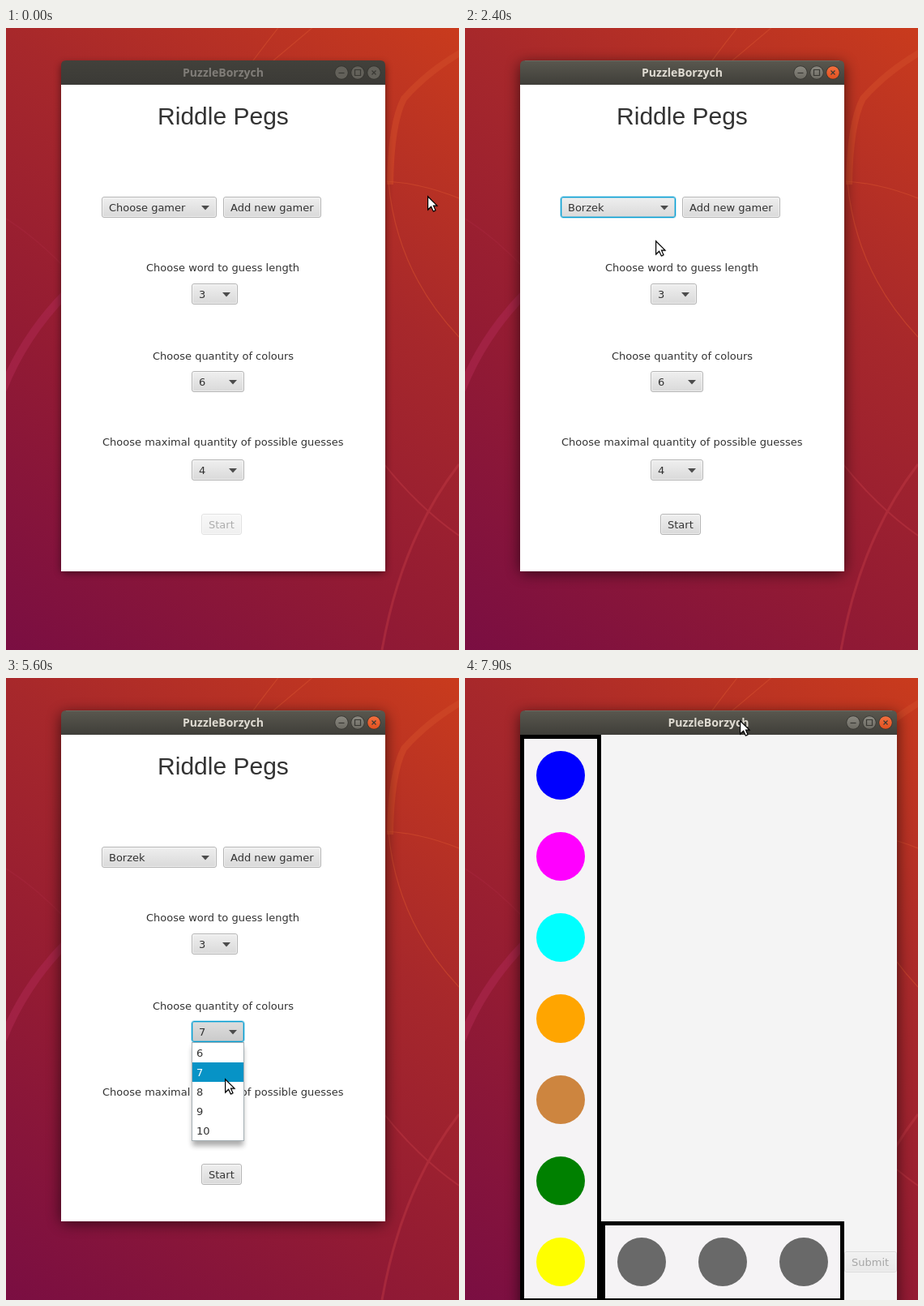
Recreate the animation shown at these times as an HTML page. Size 559x767 px, loop 8000 ms.

```html
<!DOCTYPE html>
<html lang="en">
<head>
<meta charset="utf-8">
<title>Riddle Pegs</title>
<style>
html, body { margin: 0; width: 100%; height: 100%; overflow: hidden; background: #951b33; }
svg { display: block; width: 559px; height: 767px; cursor: default; user-select: none; }
text { font: 13px "DejaVu Sans", sans-serif; fill: #333; white-space: pre; }
.head { font: 30px "Liberation Sans", Arial, sans-serif; text-anchor: middle; }
.bar { font: 700 14px "Open Sans", "Noto Sans", sans-serif; text-anchor: middle; }
</style>
</head>
<body>
<svg id="stage" viewBox="0 0 559 767" xmlns="http://www.w3.org/2000/svg">
  <defs>
    <linearGradient id="desk" gradientUnits="userSpaceOnUse" x1="0" y1="767" x2="559" y2="0">
      <stop offset="0" stop-color="#7a0e42"/><stop offset=".35" stop-color="#931b33"/>
      <stop offset=".65" stop-color="#a7282b"/><stop offset="1" stop-color="#c93b1d"/>
    </linearGradient>
    <linearGradient id="barOn" x2="0" y2="1"><stop stop-color="#5a584f"/><stop offset="1" stop-color="#3f3e39"/></linearGradient>
    <linearGradient id="barOff" x2="0" y2="1"><stop stop-color="#42413b"/><stop offset="1" stop-color="#3b3a36"/></linearGradient>
    <linearGradient id="knob" x2="0" y2="1"><stop stop-color="#8a8880"/><stop offset="1" stop-color="#6d6b63"/></linearGradient>
    <linearGradient id="close" x2="0" y2="1"><stop stop-color="#f4703f"/><stop offset="1" stop-color="#e1501f"/></linearGradient>
    <linearGradient id="normal" x2="0" y2="1"><stop stop-color="#efefef"/><stop offset="1" stop-color="#d9d9d9"/></linearGradient>
    <linearGradient id="hover" x2="0" y2="1"><stop stop-color="#fafafa"/><stop offset="1" stop-color="#e5e5e5"/></linearGradient>
    <linearGradient id="armed" x2="0" y2="1"><stop stop-color="#dedede"/><stop offset="1" stop-color="#cacaca"/></linearGradient>
    <filter id="soft" x="-20%" y="-20%" width="140%" height="140%"><feGaussianBlur stdDeviation="9"/></filter>
    <filter id="faint" x="-20%" y="-20%" width="140%" height="140%"><feGaussianBlur stdDeviation="5"/></filter>
    <filter id="drop" x="-30%" y="-30%" width="160%" height="170%"><feGaussianBlur stdDeviation="3"/></filter>
  </defs>
  <rect width="559" height="767" fill="url(#desk)"/>
  <g fill="none">
    <path d="M-4 446Q22 380 74 327" stroke="#a8264a" stroke-width="10" opacity=".7"/>
    <path d="M0 235Q36 258 70 293" stroke="#a82a40" stroke-width="1.5" opacity=".4"/>
    <path d="M474 193Q475 118 491 87Q520 54 563 29" stroke="#d04a28" stroke-width="8" opacity=".6"/>
    <g stroke="#d5502e" stroke-width="1.2" opacity=".55">
      <path d="M305 40Q335 0 360 -30M330 40Q354 20 380 -2"/>
      <path d="M470 189Q515 192 559 210M472 190Q482 300 559 381"/>
    </g>
    <g stroke="#c23a45" stroke-width="2" opacity=".45">
      <path d="M466 537Q508 590 559 626"/>
      <path d="M559 538Q488 630 464 767" stroke-width="3"/>
    </g>
  </g>
  <g id="view"></g>
  <g id="mouse">
    <path d="M1 1.5V18.5L5 14.8L7.7 20.5L10.8 19.1L8.2 13.5H13Z" fill="#000" opacity=".22"/>
    <path d="M.6 .8V17L4.6 13.2L7.3 19L10 17.8L7.5 12.2H12Z" fill="#fff" stroke="#000" stroke-width="1.2"/>
  </g>
</svg>
<script>
const LOOP = 8000, STEP = 100;
const view = document.getElementById('view');
const mouse = document.getElementById('mouse');

// time, x, y of the pointer tip
const path = [
  [200, 520, 207], [1100, 245, 227], [1200, 245, 227], [1800, 237, 247],
  [2200, 237, 247], [2400, 235, 262], [3100, 271, 324], [3300, 271, 328],
  [3900, 271, 328], [4000, 271, 329], [4400, 271, 437], [4900, 271, 437],
  [5100, 270, 490], [5500, 270, 490], [6400, 270, 605], [6800, 270, 605],
  [7700, 338, 62], [7900, 339, 52]
];

const ease = p => p * p * (3 - 2 * p);

function pointer(t) {
  if (t <= path[0][0]) return path[0].slice(1);
  for (let i = 1; i < path.length; i++) {
    const [t0, x0, y0] = path[i - 1], [t1, x1, y1] = path[i];
    if (t <= t1) {
      const p = ease((t - t0) / (t1 - t0));
      return [Math.round(x0 + (x1 - x0) * p), Math.round(y0 + (y1 - y0) * p)];
    }
  }
  return path[path.length - 1].slice(1);
}

const rect = (x, y, w, h, more) => `<rect x="${x}" y="${y}" width="${w}" height="${h}" ${more}/>`;
const disc = (x, y, r, fill) => `<circle cx="${x}" cy="${y}" r="${r}" fill="${fill}"/>`;
const text = (x, y, s, more = '') => `<text x="${x}" y="${y}" ${more}>${s}</text>`;
const inside = ([px, py], x, y, w, h) => px >= x && px < x + w && py >= y && py < y + h;

function button(x, y, w, label, { over, armed, ring, off } = {}) {
  const fill = armed ? 'armed' : over ? 'hover' : 'normal';
  let s = rect(x + .5, y + .5, w - 1, 25, `rx="2.5" fill="url(#${fill})" stroke="${ring ? '#039ed3' : '#b5b5b5'}"`);
  s += rect(x + 1.5, y + 1.5, w - 3, 23, `rx="1.5" fill="none" stroke="${ring ? '#039ed3' : '#fff'}" opacity="${ring ? .35 : .5}"`);
  if (ring) s += rect(x - .5, y - .5, w + 1, 27, 'rx="3.5" fill="none" stroke="#039ed3" opacity=".25"');
  return `<g opacity="${off ? .4 : 1}">${s}${text(x + 9, y + 18, label)}</g>`;
}

function combo(x, y, w, label, state) {
  return button(x, y, w, label, state) +
    `<path d="M${x + w - 19} ${y + 11}h10l-5 5.5z" fill="#4c4c4c"/>`;
}

function popup(x, y, w, items, chosen) {
  const h = items.length * 24 + 2;
  let s = rect(x + 1, y + 6, w - 2, h, 'fill="#000" opacity=".32" filter="url(#drop)"');
  s += rect(x + .5, y + .5, w - 1, h - 1, 'fill="#fff" stroke="#a6b0b5"');
  items.forEach((item, i) => {
    const on = i === chosen, top = y + 1 + i * 24;
    if (on) s += rect(x + 1, top, w - 2, 24, 'fill="#0793c6"');
    s += text(x + 6, top + 17, item, on ? 'style="fill:#fff"' : '');
  });
  return s;
}

function frame(w, h, active, body) {
  const right = 68 + w, mid = 68 + w / 2;
  let s = rect(68, 44, w, h - 2, `rx="5" fill="#000" opacity="${active ? .62 : .5}" filter="url(#${active ? 'soft' : 'faint'})"`);
  s += rect(68, 70, w, h - 30, `fill="${body}"`);
  s += `<path d="M68 70V46q0-6 6-6H${right - 6}q6 0 6 6V70Z" fill="url(#${active ? 'barOn' : 'barOff'})"/>`;
  if (active) s += `<path d="M74 40.5H${right - 6}" stroke="#6b6961"/>`;
  s += text(mid, 60, 'PuzzleBorzych', `class="bar" style="fill:${active ? '#dfdbd2' : '#807d78'}"`);
  [54, 34, 14].forEach((d, i) => {
    const x = right - d, fill = !active ? '#63615a' : i === 2 ? 'url(#close)' : 'url(#knob)';
    const mark = ['M-3.5 .5H3.5', 'M-3.5 -3.5H3.5V3.5H-3.5Z', 'M-2.5 -2.5L2.5 2.5M2.5 -2.5L-2.5 2.5'][i];
    s += `<g transform="translate(${x} 55)">${disc(0, 0, 8.5, '#33322e')}${disc(0, 0, 7.8, fill)}` +
      `<path d="${mark}" fill="none" stroke="#3a3934" stroke-width="1.2"/></g>`;
  });
  return s;
}

function setup(t, at) {
  const active = t >= 600;
  const focus = !active ? '' : t < 1300 ? 'word' : t < 4700 ? 'gamer' : t < 5700 ? 'colour' : t < 6700 ? '' : 'start';
  const gamers = t >= 1400 && t < 2400, colours = t >= 4800 && t < 5700;
  const open = gamers || colours;
  const state = (name, x, y, w, armed) => ({
    over: !open && inside(at, x, y, w, 26), ring: focus === name, armed
  });
  const ready = t >= 2300;
  let s = frame(400, 630, active, '#fff');
  s += text(268, 119, 'Riddle Pegs', 'class="head"');
  s += combo(118, 208, 142, ready ? 'Borzek' : 'Choose gamer', state('gamer', 118, 208, 142, t >= 1300 && t < 2400));
  s += button(268, 208, 121, 'Add new gamer', state('add', 268, 208, 121));
  s += text(173, 300, 'Choose word to guess length');
  s += combo(229, 315, 57, '3', state('word', 229, 315, 57));
  s += text(181, 409, 'Choose quantity of colours');
  s += combo(229, 423, 65, t >= 5600 ? '7' : '6', state('colour', 229, 423, 65, t >= 4700 && t < 5700));
  s += text(119, 515, 'Choose maximal quantity of possible guesses');
  s += combo(229, 532, 65, '4', state('guess', 229, 532, 65));
  s += button(241, 599, 50, 'Start', { ...state('start', 241, 599, 50, t >= 6700), off: !ready });
  if (gamers) s += popup(118, 234, 142, ['Borzek'], at[1] > 235 ? 0 : -1);
  if (colours) s += popup(229, 449, 65, [6, 7, 8, 9, 10], at[1] >= 474 ? 1 : 0);
  return s;
}

function game() {
  const pegs = ['#00f', '#f0f', '#0ff', '#ffa500', '#cd853f', '#008000', '#ff0'];
  const box = 'fill="#f5f3f5" stroke="#000" stroke-width="5"';
  let s = frame(465, 760, true, '#f4f4f4');
  s += rect(70.5, 72.5, 95, 695, box) + rect(170.5, 672.5, 295, 95, box);
  pegs.forEach((c, i) => { s += disc(118, 120 + i * 100, 30, c); });
  for (let i = 0; i < 3; i++) s += disc(218 + i * 100, 720, 30, '#696969');
  return s + button(468, 707, 65, 'Submit', { off: true });
}

let last = '';
function draw(t) {
  const at = pointer(t);
  const html = t < 6900 ? setup(t, at) : game();
  if (html !== last) view.innerHTML = last = html;
  mouse.setAttribute('transform', `translate(${at[0]} ${at[1]})`);
}

const began = performance.now();
function tick(now) {
  const t = Math.max(0, now - began) % LOOP;
  draw(Math.floor(t / STEP) * STEP);
  requestAnimationFrame(tick);
}
draw(0);
requestAnimationFrame(tick);
</script>
</body>
</html>
```
